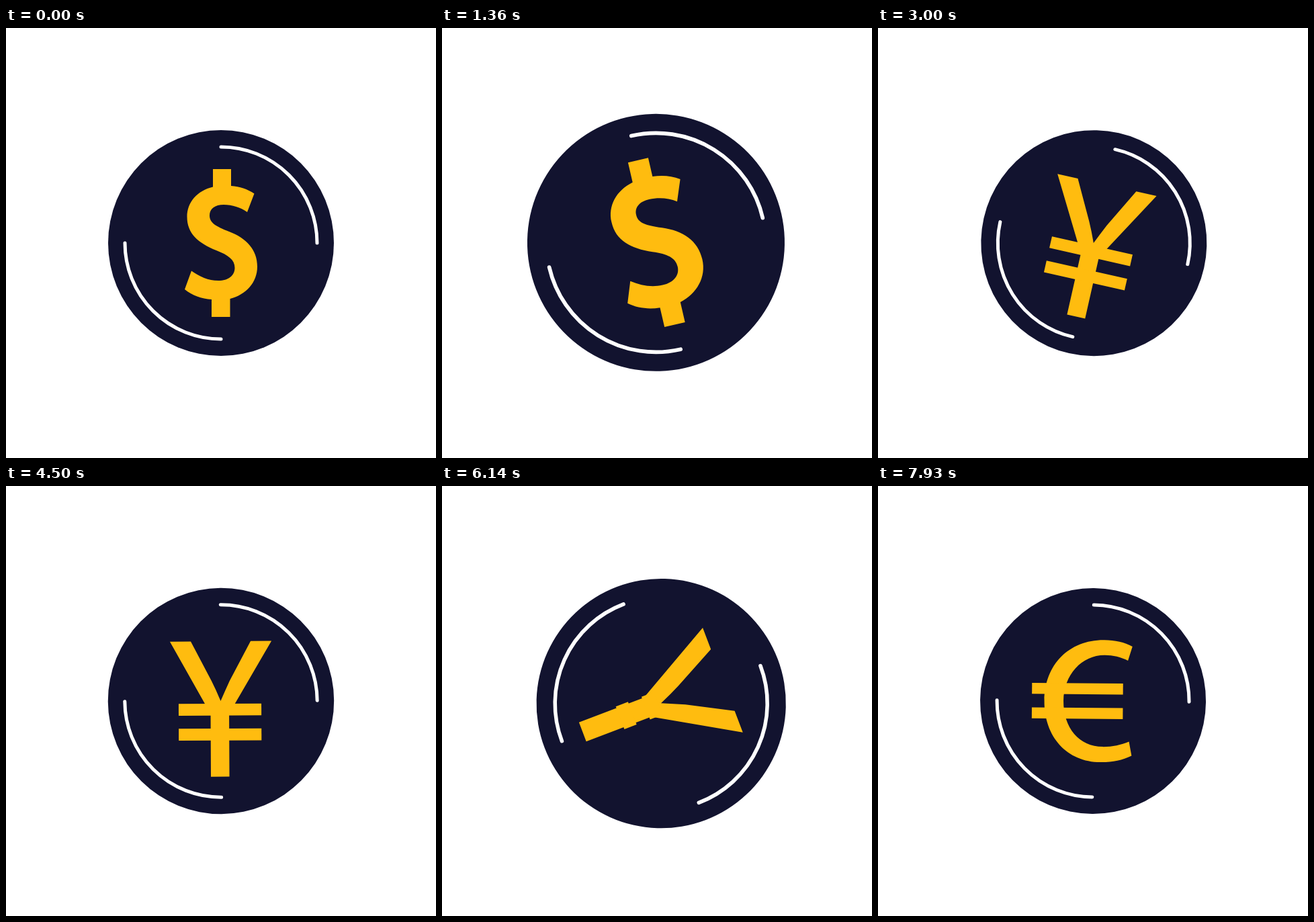
An HTML page with a canvas that plays this animation: 640 by 640 pixels, repeating every 8 s.

```html
<!DOCTYPE html>
<html lang="en">
<head>
<meta charset="utf-8">
<title>Currency coin</title>
<style>
  html, body { margin: 0; width: 100%; height: 100%; overflow: hidden; background: #fff; }
  canvas { display: block; width: 100vmin; height: 100vmin; }
</style>
</head>
<body>
<canvas id="stage" width="640" height="640"></canvas>
<script>
const ctx = document.getElementById('stage').getContext('2d');
const LOOP = 8000;
const SECOND_FLIP = 4455;
const SWAP = 1840;
const PIVOT = { x: 320, y: 326 };
const NAVY = '#12132f', GOLD = '#ffbc0f', WHITE = '#fff';

const dollar = {
  body: new Path2D(`M369.5 246.5 L359 274 C349 267 337 263 324 263 C311 263 303 269 303 279
    C303 290 312 295 332 303 C358 313 374 330 374 355 C374 379 357 397 333.5 403
    V430 H306 V404 C291 403 277 398 266 389 L276 361.5 C288 370 301 376 316 376
    C331 376 340.5 368.5 340.5 357 C340.5 345 331 338 313 331 C286 320 269.5 306 269.5 281
    C269.5 259 285 242 308 236.5 V210 H335 V235 C348 236 359 239.5 369.5 246.5 Z`)
};

const yen = {
  body: new Path2D(`M244.5 231.5 H275.5 L306 290 Q313 304 319.5 320 Q326 305 333 290
    L364.5 231 H395.5 L341 323.5 L332 339 V432.5 H304.5 V339 L296 324 Z`),
  bars: { left: 257, right: 380, anchor: 318.5, tops: [324, 361], height: 17.6, grown: 2200 }
};

const euro = {
  body: new Path2D(`M378 238.5 L371.5 259.5 C361 254 349 251.5 337 251.5
    C303 251.5 276 281 276 320 C276 360 300 388 335 388 C349 388 362 385 374 380
    L378 401 C364 408 350 411 332 411 C282 411 247.5 374 247.5 320
    C247.5 266 284 229 336 229 C352 229 366 232 378 238.5 Z`),
  bars: { left: 229, right: 364.5, anchor: 253, tops: [293.7, 330.2], height: 16.4, grown: 2300 }
};

// Ease with flat ends; p and q are the x positions of the two handles.
function ease(x, p, q) {
  if (x <= 0) return 0;
  if (x >= 1) return 1;
  let low = 0, high = 1;
  for (let i = 0; i < 30; i++) {
    const s = (low + high) / 2, r = 1 - s;
    if (3 * p * s * r * r + 3 * q * s * s * r + s * s * s < x) low = s;
    else high = s;
  }
  return low * low * (3 - 2 * low);
}

// Keys: [start, end, change, handle p, handle q]
function track(t, base, keys) {
  return keys.reduce((value, [start, end, change, p, q]) =>
    value + change * ease((t - start) / (end - start), p, q), base);
}

const angleAt = t => track(t, 0, [
  [0, 885, -35, 0.33, 0.67],
  [885, 2785, 410, 0.76, 0.22],
  [2785, 3720, -15, 0.5, 0.05]
]);

const scaleAt = t => track(t, 1, [
  [0, 860, 0.153, 0.33, 0.67],
  [885, 2180, -0.153, 0.83, 0.77]
]);

function drawCoin() {
  ctx.fillStyle = NAVY;
  ctx.beginPath();
  ctx.arc(320, 320, 168, 0, Math.PI * 2);
  ctx.fill();

  ctx.strokeStyle = WHITE;
  ctx.lineWidth = 5;
  ctx.lineCap = 'round';
  for (const start of [-Math.PI / 2, Math.PI / 2]) {
    ctx.beginPath();
    ctx.arc(320, 320, 143, start, start + Math.PI / 2);
    ctx.stroke();
  }
}

function drawSymbol({ body, bars }, barScale) {
  ctx.fillStyle = GOLD;
  ctx.fill(body);
  if (!bars) return;
  const left = bars.anchor + (bars.left - bars.anchor) * barScale;
  const width = (bars.right - bars.left) * barScale;
  for (const top of bars.tops) ctx.fillRect(left, top, width, bars.height);
}

function draw(time) {
  const second = time >= SECOND_FLIP;
  const t = second ? time - SECOND_FLIP : time;
  const [before, after] = second ? [yen, euro] : [dollar, yen];
  const swapped = t >= SWAP;
  const barScale = swapped
    ? ease((t - SWAP) / (after.bars.grown - SWAP), 0.33, 0.67)
    : 1 - ease((t - 885) / (SWAP - 885), 0.85, 0.8);
  const scale = scaleAt(t);

  ctx.fillStyle = WHITE;
  ctx.fillRect(0, 0, 640, 640);
  ctx.save();
  ctx.translate(PIVOT.x, PIVOT.y);
  ctx.rotate(angleAt(t) * Math.PI / 180);
  ctx.scale(scale, scale);
  ctx.translate(-PIVOT.x, -PIVOT.y);
  drawCoin();
  drawSymbol(swapped ? after : before, barScale);
  ctx.restore();
}

const begin = performance.now();
function tick() {
  draw((performance.now() - begin) % LOOP);
  requestAnimationFrame(tick);
}
tick();
</script>
</body>
</html>
```
